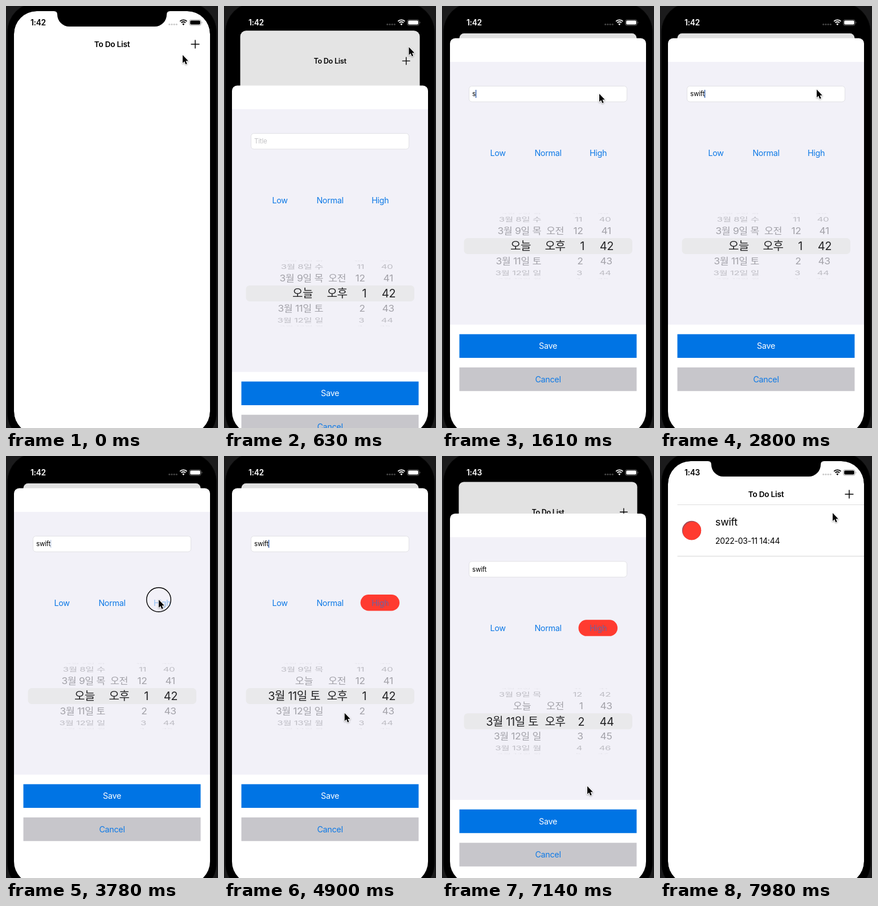
Recreate the animation shown at these times as an HTML page with a canvas. Size 372 by 740 pixels, loop 8000 ms.

```html
<!DOCTYPE html>
<html lang="ko">
<head>
<meta charset="utf-8">
<title>To Do List</title>
<style>
html, body { margin: 0; width: 100%; height: 100%; overflow: hidden; background: #000; }
canvas { display: block; width: 372px; height: 740px; }
</style>
</head>
<body>
<canvas id="stage"></canvas>
<script>
const W = 372, H = 740, LOOP = 8000, STEP = 70;
const FONT = 'Inter, "Noto Sans CJK KR", "Noto Sans CJK JP", "Noto Sans CJK", sans-serif';
const BLUE = '#0d79e6', RED = '#ff3b30';

const canvas = document.getElementById('stage');
const ctx = canvas.getContext('2d');
const dpr = window.devicePixelRatio || 1;
canvas.width = W * dpr;
canvas.height = H * dpr;

// time, x, y of the pointer tip
const pointerPath = [
  [70, 310, 86], [280, 329, 67], [490, 329, 67], [840, 316, 81], [1190, 277, 152],
  [1400, 276, 154], [1750, 276, 154], [1820, 275, 147], [2730, 275, 147],
  [2870, 275, 146], [3010, 275, 148], [3640, 268, 252], [3840, 268, 252],
  [4130, 168, 441], [4620, 168, 441], [5110, 240, 457], [5600, 240, 457],
  [6090, 282, 466], [6440, 282, 466], [6840, 255, 579], [7490, 255, 579],
  [7770, 255, 370], [7910, 284, 180], [7980, 303, 100]
];
// start and end of each press
const presses = [[280, 420], [1190, 1330], [3700, 3840], [4340, 4480], [5320, 5460], [6230, 6370], [6900, 7000]];
// moment each letter arrives
const typed = [[1540, 's'], [2100, 'w'], [2310, 'i'], [2520, 'f'], [2800, 't']];

const clamp = v => Math.max(0, Math.min(1, v));
const ramp = (t, a, b) => clamp((t - a) / (b - a));
const smooth = k => k * k * (3 - 2 * k);
const easeOut = k => 1 - (1 - k) ** 3;
const isDown = (t, i) => t >= presses[i][0] && t < presses[i][1];

function spring(ms) {
  const k = Math.max(0, ms) * 0.0164;
  return 1 - (1 + k) * Math.exp(-k);
}

function pointerAt(t) {
  let a = pointerPath[0];
  for (const b of pointerPath) {
    if (t < b[0]) {
      const k = smooth(ramp(t, a[0], b[0]));
      return [a[1] + (b[1] - a[1]) * k, a[2] + (b[2] - a[2]) * k];
    }
    a = b;
  }
  return [a[1], a[2]];
}

function box(x, y, w, h, r, fill, line) {
  ctx.beginPath();
  ctx.roundRect(x, y, w, h, r);
  if (fill) { ctx.fillStyle = fill; ctx.fill(); }
  if (line) { ctx.strokeStyle = line; ctx.lineWidth = 1; ctx.stroke(); }
}

function disc(x, y, r, fill) {
  ctx.beginPath();
  ctx.arc(x, y, r, 0, 7);
  ctx.fillStyle = fill;
  ctx.fill();
}

// y is the middle of the capitals
function text(str, x, y, size, color, align = 'left', weight = 400) {
  ctx.letterSpacing = (-0.02 * size).toFixed(2) + 'px';
  ctx.font = `${weight} ${size}px ${FONT}`;
  ctx.textAlign = align;
  ctx.textBaseline = 'alphabetic';
  ctx.fillStyle = color;
  ctx.fillText(str, x, y + size * 0.363);
}

function drawBody() {
  ctx.fillStyle = '#1b1b1c';
  ctx.fillRect(0, 0, W, H);
  box(2.5, -6, 367, 772, 52, '#000', '#0c0c0c');
}

function drawPlus(alpha) {
  ctx.globalAlpha = alpha;
  ctx.strokeStyle = '#000';
  ctx.lineWidth = 1.5;
  ctx.beginPath();
  ctx.moveTo(324.5, 67); ctx.lineTo(339.5, 67);
  ctx.moveTo(332, 59.5); ctx.lineTo(332, 74.5);
  ctx.stroke();
  ctx.globalAlpha = 1;
}

function drawRow() {
  ctx.fillStyle = '#dedede';
  ctx.fillRect(30.5, 85, 328, 1);
  ctx.fillRect(30.5, 175, 328, 1.3);
  ctx.save();
  disc(55.5, 130.5, 16.7, '#a04a58');
  ctx.clip();
  disc(57, 132.3, 17, RED);
  ctx.restore();
  text('swift', 97, 115.5, 18, '#000');
  text('2022-03-11 14:44', 97, 149, 14.1, '#000');
}

function drawHome(t, p) {
  const s = 1 - 0.096 * p;
  ctx.save();
  ctx.translate(186, 9 + 39 * p);
  ctx.scale(s, s);
  ctx.translate(-186, -9);
  box(14, 9, 344, 742, 40 - 31 * Math.min(1, p * 1.05), '#fff');
  ctx.clip();
  text('To Do List', 186, 67, 13.7, '#000', 'center', 600);
  drawPlus(isDown(t, 0) ? 0.3 : 1);
  if (t >= 7000) drawRow();
  ctx.fillStyle = `rgba(0,0,0,${0.12 * p})`;
  ctx.fillRect(14, 9, 344, 742);
  ctx.restore();
}

const WEEK = '일월화수목금토';
const columns = [
  {
    label: i => i === 10 ? '오늘' : `3월 ${i}일 ${WEEK[(i + 2) % 7]}`,
    align: 'right',
    big: i => i === 10 ? 156 : 169,
    small: i => i === 10 ? 156 : 174
  },
  { label: i => ['오전', '오후'][i] || '', align: 'center', big: () => 198.5, small: () => 198.5 },
  { label: i => String((i + 11) % 12 + 1), align: 'right', big: () => 250, small: (i, d) => 248 - 0.5 * d * d },
  { label: i => String(i), align: 'center', big: () => 289, small: (i, d) => 288.7 - 0.7 * d * d }
];

function drawColumn(col, pos, lens) {
  for (let i = Math.round(pos) - 3; i <= Math.round(pos) + 3; i++) {
    const d = i - pos, angle = d * 0.48;
    if (Math.abs(angle) > 1.5) continue;
    const c = Math.cos(angle), x = lens ? col.big(i) : col.small(i, d);
    ctx.save();
    ctx.translate(x, 421 + (lens ? d * 28 : 57.4 * Math.sin(angle)));
    if (!lens) ctx.scale(1 - 0.01 * d * d, c);
    text(col.label(i), 0, 0, lens ? 20 : 17.5, lens ? '#232325' : `rgba(60,60,67,${0.5 * c})`, col.align);
    ctx.restore();
  }
}

function drawPicker(t) {
  const pos = [
    10 + easeOut(ramp(t, 4400, 4800)),
    1,
    1 + easeOut(ramp(t, 5400, 5800)),
    42 + 2 * easeOut(ramp(t, 6300, 6750))
  ];
  box(38.5, 407, 295.5, 28, 6.5, '#e9e9eb');
  for (const lens of [false, true]) {
    ctx.save();
    ctx.beginPath();
    if (lens) ctx.rect(38, 407, 297, 28);
    else { ctx.rect(38, 360, 297, 47); ctx.rect(38, 435, 297, 47); }
    ctx.clip();
    columns.forEach((col, i) => drawColumn(col, pos[i], lens));
    ctx.restore();
  }
}

function caretAlpha(t) {
  if (t < 1260 || t >= 6930) return 0;
  let last = 1260;
  for (const [at] of typed) if (t >= at) last = at;
  const k = (t - last) % 1000;
  return k < 500 ? 1 : Math.max(1 - ramp(k, 500, 680), ramp(k, 950, 1050));
}

function drawField(t) {
  box(47.5, 140.5, 277, 27.5, 5, '#fff', '#e1e1e5');
  const str = typed.filter(k => t >= k[0]).map(k => k[1]).join('');
  if (str) text(str, 53, 154, 11.6, '#000');
  else text('Title', 53, 154, 11.6, '#c3c3c6');
  const a = caretAlpha(t);
  if (!a) return;
  const end = str ? ctx.measureText(str).width : 0;
  ctx.globalAlpha = a;
  ctx.fillStyle = '#2456a8';
  ctx.fillRect(53 + end, 147, 1.3, 14);
  ctx.globalAlpha = 1;
}

function drawSheet(t, p) {
  if (p < 0.001) return;
  ctx.save();
  ctx.translate(0, 690 * (1 - p));
  box(14, 56.6, 344, 900, [9, 9, 0, 0], '#fff');
  ctx.fillStyle = '#f2f1f8';
  ctx.fillRect(14, 98, 344, 460.7);
  drawField(t);

  text('Low', 98, 257.5, 14.3, BLUE, 'center');
  text('Normal', 186, 257.5, 14.3, BLUE, 'center');
  const chosen = t >= 3850;
  if (chosen) box(239.5, 243, 68.5, 28.5, 14.2, RED);
  ctx.globalAlpha = chosen ? 0.6 : isDown(t, 2) ? 0.4 : 1;
  text('High', 274, 257.5, 14.3, BLUE, 'center');
  ctx.globalAlpha = 1;

  drawPicker(t);

  box(30.5, 575.5, 311, 41.5, 0, '#0074e4');
  text('Save', 186, 596.3, 14.3, isDown(t, 6) ? 'rgba(255,255,255,.4)' : '#fff', 'center');
  box(30.5, 633.8, 311, 41.5, 0, '#c7c6cb');
  text('Cancel', 186, 654.5, 14.3, BLUE, 'center');
  ctx.restore();
}

function drawNotch() {
  ctx.fillStyle = '#000';
  ctx.beginPath();
  ctx.moveTo(84, 7);
  ctx.lineTo(84, 9);
  ctx.quadraticCurveTo(90, 9, 90, 15);
  ctx.arcTo(90, 36, 112, 36, 21);
  ctx.arcTo(282, 36, 282, 15, 21);
  ctx.lineTo(282, 15);
  ctx.quadraticCurveTo(282, 9, 288, 9);
  ctx.lineTo(288, 7);
  ctx.fill();
}

function drawStatus(t, p) {
  const k = clamp((p - 0.3) / 0.4);
  const grey = v => `rgb(${v},${v},${v})`;
  const ink = grey(Math.round(255 * k));
  const soft = grey(Math.round(200 - 130 * k));
  text(t < 5600 ? '1:42' : '1:43', 43, 29.2, 13.8, ink, 'left', 600);
  for (let i = 0; i < 4; i++) disc(286.7 + i * 4.2, 32.2, 1.5, soft);

  ctx.strokeStyle = ink;
  ctx.lineWidth = 1.9;
  for (const r of [8.6, 5.2]) {
    ctx.beginPath();
    ctx.arc(311.3, 33, r, -Math.PI * 0.75, -Math.PI * 0.25);
    ctx.stroke();
  }
  ctx.beginPath();
  ctx.moveTo(311.3, 34);
  ctx.arc(311.3, 33.5, 2.8, -Math.PI * 0.75, -Math.PI * 0.25);
  ctx.fillStyle = ink;
  ctx.fill();

  box(321.8, 24.2, 20.4, 9.8, 3, null, grey(Math.round(165 - 60 * k)));
  box(323.2, 25.6, 17.6, 7, 1.8, ink);
  box(343.2, 27.6, 1.3, 3, 0.7, soft);
}

function drawPointer(t) {
  const [x, y] = pointerAt(t);
  if (presses.some((_, i) => isDown(t, i))) {
    ctx.beginPath();
    ctx.arc(x, y, 21.3, 0, 7);
    ctx.strokeStyle = '#000';
    ctx.lineWidth = 1.4;
    ctx.stroke();
  }
  ctx.save();
  ctx.translate(x, y);
  ctx.beginPath();
  ctx.moveTo(0, 0);
  ctx.lineTo(0, 14);
  ctx.lineTo(3.1, 11.1);
  ctx.lineTo(5.3, 16.2);
  ctx.lineTo(7.7, 15.2);
  ctx.lineTo(5.5, 10.2);
  ctx.lineTo(9.8, 10.2);
  ctx.closePath();
  ctx.lineJoin = 'round';
  ctx.strokeStyle = '#fff';
  ctx.lineWidth = 2;
  ctx.shadowColor = 'rgba(0,0,0,.35)';
  ctx.shadowBlur = 2.5 * dpr;
  ctx.shadowOffsetY = dpr;
  ctx.stroke();
  ctx.shadowColor = 'transparent';
  ctx.fillStyle = '#000';
  ctx.fill();
  ctx.restore();
}

function draw(t) {
  const p = t < 7115 ? spring(t - 407) : 1 - spring(t - 7115);
  ctx.setTransform(dpr, 0, 0, dpr, 0, 0);
  drawBody();
  ctx.save();
  ctx.beginPath();
  ctx.roundRect(14, 9, 344, 742, 40);
  ctx.clip();
  drawHome(t, p);
  drawSheet(t, p);
  ctx.restore();
  drawNotch();
  drawStatus(t, p);
  drawPointer(t);
}

const start = performance.now();
function tick() {
  const t = (performance.now() - start) % LOOP;
  draw(Math.floor(t / STEP) * STEP);
  requestAnimationFrame(tick);
}
tick();
</script>
</body>
</html>
```
